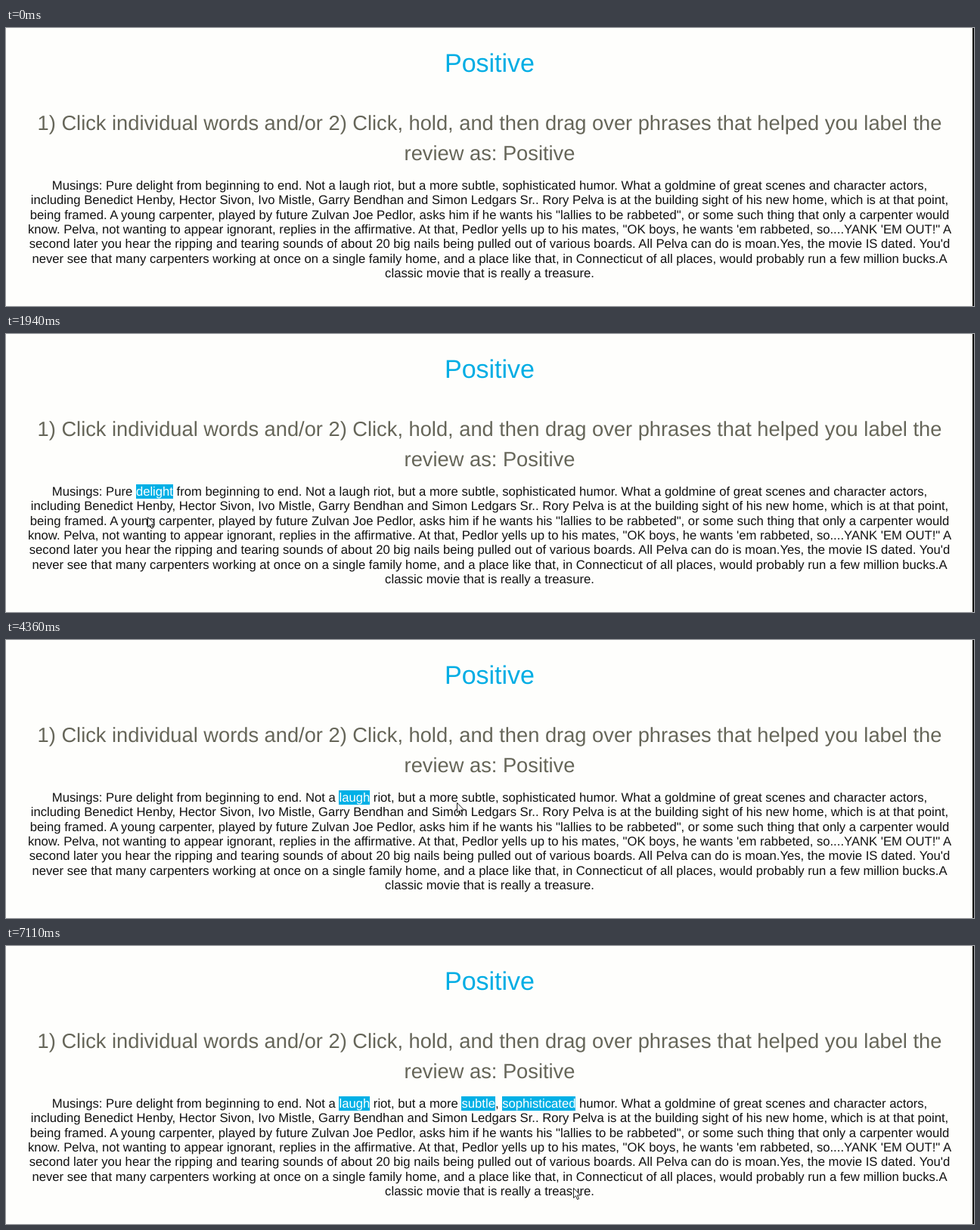
An HTML page for the animation above (7.16 s loop, 1280x368 px).

```html
<!DOCTYPE html>
<html lang="en">
<head>
<meta charset="utf-8">
<title>Highlight the helpful words</title>
<style>
  html, body { margin: 0; width: 100%; height: 100%; overflow: hidden; background: #fefefc; }
  body {
    position: relative;
    font-family: "Liberation Sans", Arial, sans-serif;
    text-rendering: geometricPrecision;
  }
  h1, h2, p {
    position: absolute; left: 0; width: 1279px; margin: 0;
    text-align: center; white-space: nowrap; font-weight: 400;
  }
  h1 { top: 27px; font-size: 34px; line-height: 40px; color: #00ade4; }
  h2 { top: 105.5px; font-size: 27.27px; line-height: 40px; color: #666659; }
  p { top: 199px; font-size: 16.67px; line-height: 19.33px; color: #111; }
  .on { background: #00b0e6; color: #fff; }
  .edge { position: absolute; left: 1278px; top: 0; width: 2px; height: 368px; background: #0a0a00; }
  svg { position: absolute; left: 0; top: 0; overflow: visible; }
</style>
</head>
<body>
<h1>Positive</h1>
<h2>1) Click individual words and/or 2) Click, hold, and then drag over phrases that helped you label the<br>
review as: Positive</h2>
<p>Musings: Pure <span id="delight">delight</span> from beginning to end. Not a <span id="laugh">laugh</span> riot, but a more <span id="subtle">subtle</span>, <span id="sophisticated">sophisticated</span> humor. What a goldmine of great scenes and character actors,<br>
including Benedict Henby, Hector Sivon, Ivo Mistle, Garry Bendhan and Simon Ledgars Sr.. Rory Pelva is at the building sight of his new home, which is at that point,<br>
being framed. A young carpenter, played by future Zulvan Joe Pedlor, asks him if he wants his "lallies to be rabbeted", or some such thing that only a carpenter would<br>
know. Pelva, not wanting to appear ignorant, replies in the affirmative. At that, Pedlor yells up to his mates, "OK boys, he wants 'em rabbeted, so....YANK 'EM OUT!" A<br>
second later you hear the ripping and tearing sounds of about 20 big nails being pulled out of various boards. All Pelva can do is moan.Yes, the movie IS dated. You'd<br>
never see that many carpenters working at once on a single family home, and a place like that, in Connecticut of all places, would probably run a few million bucks.A<br>
classic movie that is really a treasure.</p>
<div class="edge"></div>
<svg id="cursor" width="12" height="18">
  <path d="M.5 .5V13.5L3.5 10.8L5.5 15.5L7.5 14.6L5.5 10H9.6Z" fill="#fff" stroke="#222" stroke-width="1"/>
</svg>
<script>
const LOOP = 7160;

// Pointer stops: time, x, y
const path = [
  [300, 262, 370], [950, 195, 205], [1500, 195, 205], [1900, 187, 242],
  [2050, 187, 242], [2350, 196, 206], [2750, 196, 206], [3370, 452, 227],
  [3600, 458, 207], [3900, 458, 207], [4360, 596, 215], [4600, 622, 207],
  [5100, 622, 207], [5600, 699, 205], [6200, 699, 205], [6800, 750, 320]
];

// When each word is selected: from, to
const picks = {
  delight: [1450, 2650],
  laugh: [3800, LOOP],
  subtle: [4900, LOOP],
  sophisticated: [6080, LOOP]
};

const byId = id => document.getElementById(id);
const cursor = byId("cursor");

function pointerAt(t) {
  const i = path.findIndex(stop => stop[0] > t);
  if (i < 0) return path[path.length - 1].slice(1);
  if (i === 0) return path[0].slice(1);
  const [t0, x0, y0] = path[i - 1], [t1, x1, y1] = path[i];
  const u = (t - t0) / (t1 - t0), k = u * u * (3 - 2 * u);
  return [x0 + (x1 - x0) * k, y0 + (y1 - y0) * k];
}

function draw(now) {
  const t = now % LOOP;
  const [x, y] = pointerAt(t);
  cursor.style.transform = `translate(${x}px, ${y}px)`;
  for (const [id, [from, to]] of Object.entries(picks))
    byId(id).classList.toggle("on", t >= from && t < to);
}

const start = performance.now();
function tick() {
  draw(performance.now() - start);
  requestAnimationFrame(tick);
}
tick();
</script>
</body>
</html>
```
